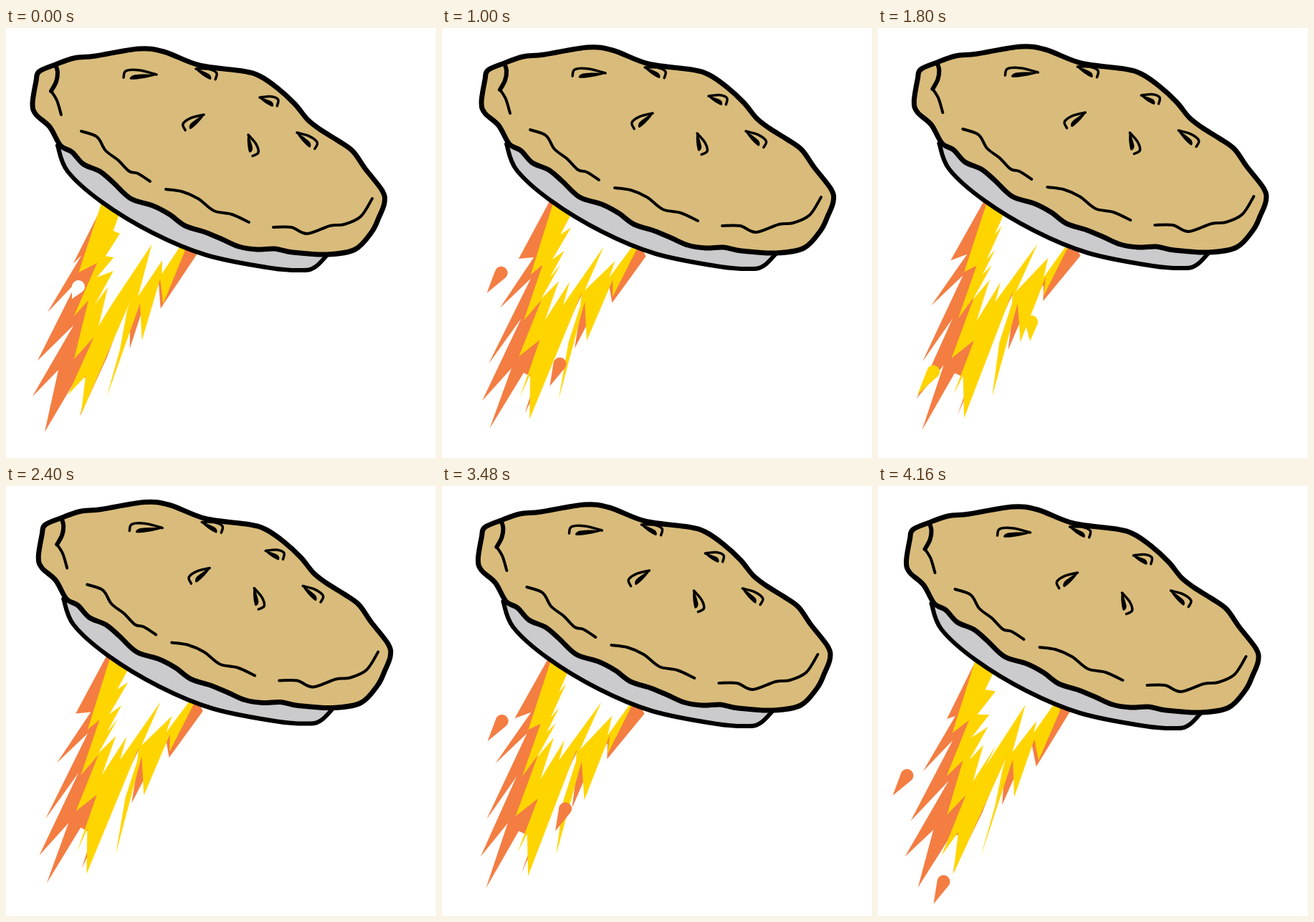
These frames come from a looping animation (600 px wide and 600 px high, 4200 ms). An HTML page with a canvas:

```html
<!DOCTYPE html>
<html>
<head>
<meta charset="utf-8">
<style>
html, body { margin: 0; width: 100%; height: 100%; overflow: hidden; background: #fff }
canvas { display: block }
</style>
</head>
<body>
<canvas width="600" height="600"></canvas>
<script>
const ctx = document.querySelector('canvas').getContext('2d');
const ORANGE = '#f47d42', YELLOW = '#ffd500', WHITE = '#fff', BLACK = '#000';
const STEP = 40, FRAMES = 105, CYCLE = 21, TAU = 2 * Math.PI;

const points = s => s.split(' ').map(p => p.split(',').map(Number));
const random = i => Math.abs(Math.sin(i * 12.9898) * 43758.5453) % 1;

// Smooth curve passing through all points
function curve(s, closed) {
  const p = points(s), n = p.length, path = new Path2D();
  const pt = i => p[closed ? (i + n) % n : Math.max(0, Math.min(n - 1, i))];
  path.moveTo(...p[0]);
  for (let i = 0; i < (closed ? n : n - 1); i++) {
    const [a, b, c, d] = [pt(i - 1), pt(i), pt(i + 1), pt(i + 2)];
    path.bezierCurveTo(b[0] + (c[0] - a[0]) / 6, b[1] + (c[1] - a[1]) / 6,
      c[0] - (d[0] - b[0]) / 6, c[1] - (d[1] - b[1]) / 6, ...c);
  }
  if (closed) path.closePath();
  return path;
}

// Pie offset: [phase, x, y] joined by straight moves
const sway = [[0, 0, 0], [2, 8.7, -4], [4, 18, -2], [8, 32.5, 8.5], [9, 31.5, 9],
  [16, 14, -13], [20, 2.5, 0], [CYCLE, 0, 0]];

function swayAt(phase) {
  const i = sway.findIndex(k => k[0] > phase);
  const [t0, x0, y0] = sway[i - 1], [t1, x1, y1] = sway[i];
  const u = (phase - t0) / (t1 - t0);
  return [x0 + (x1 - x0) * u, y0 + (y1 - y0) * u];
}

const flame = [
  [ORANGE, '138,238 91,327 108,319 60,394 103,351 46,467 93,411 38,518 76,476 51,563 96,487 115,490 100,542 140,455 177,368 170,449 192,395 215,360 217,388 268,317 250,290'],
  [YELLOW, '138,238 104,343 125,331 96,406 118,380 92,462 121,435 89,514 108,486 105,544 175,375 172,390 158,445 143,517 184,385 187,438 218,351 219,381 252,309 240,285'],
  [WHITE, '165,250 149,287 160,283 138,322 151,316 130,348 148,336 122,383 143,358 127,413 160,360 148,388 206,304 182,372 221,325 217,347 247,304 230,272']
].map(([color, s]) => [color, points(s)]);

// Every corner of the flame flickers around its place
function drawFlame(phase) {
  let seed = 1;
  for (const [color, corners] of flame) {
    ctx.fillStyle = color;
    ctx.beginPath();
    for (const [x, y] of corners) {
      const a = TAU * (3 * phase / CYCLE + random(seed++));
      ctx.lineTo(x + 3 * Math.cos(a), y + 4 * Math.sin(a));
    }
    ctx.fill();
  }
}

// Each path: place, velocity per step, tail vector
const volleys = [
  { color: WHITE, starts: [0], life: 6, paths: [[101, 361, -2.5, 6, -9, 17]] },
  { color: ORANGE, starts: [9, 74], life: 32,
    paths: [[95, 275, -1.9, 4.3, -20, 28], [212, 378, -4.1, 5.8, -14, 31]] },
  { color: YELLOW, starts: [33.5, 66], life: 18,
    paths: [[92, 333, -2.45, 13, -22, 32], [229, 371, -2.45, 3.65, -2, 27]] }
];

function drawDrops(t) {
  for (const { color, starts, life, paths } of volleys) {
    ctx.fillStyle = color;
    const age = t - starts.findLast(s => s <= t);
    if (!(age < life)) continue;
    for (const [x0, y0, vx, vy, dx, dy] of paths) {
      const x = x0 + vx * age, y = y0 + vy * age, a = Math.atan2(dy, dx);
      ctx.beginPath();
      ctx.arc(x, y, 9, a + 1.2, a - 1.2 + TAU);
      ctx.lineTo(x + dx, y + dy);
      ctx.fill();
    }
  }
}

const crust = curve('69,51 46,61 42,74 37,106 42,121 61,138 76,164 92,173 108,190 131,200 150,216 174,238 205,248 228,260 250,276 278,285 302,295 325,305 350,309 375,308 400,313 448,316 487,309 510,285 520,265 528,244 525,227 501,196 484,172 463,157 439,142 421,128 403,106 379,84 354,67 330,60 270,52 220,33 185,29 125,39 95,42', true);
const tin = curve('72,164 86,200 134,243 205,286 280,317 370,335 415,338 432,333 447,318');
const creases = [
  [6, '69,51 72,62 70,75 63,88'],
  [4, '63,88 71,101 77,121'],
  [4, '105,144 127,152 139,171 156,184 172,200 184,203 201,214'],
  [4, '223,225 245,228 268,238 290,255 315,260 339,271'],
  [4, '373,278 398,278 420,287 452,276 472,274 495,263 511,238']
].map(([width, s]) => [width, curve(s)]);

// A vent is an arched lip with a dark slit, placed from its tip to its tail
const lip = curve('0,0 -.5,-7 -.92,-7 -1,2');
const slit = curve('0,0 -.35,4 -.8,5 -.65,-1', true);
function vent(x, y, tailX, tailY, side) {
  const dx = x - tailX, dy = y - tailY, k = side / Math.hypot(dx, dy);
  const place = new DOMMatrix([dx, dy, -dy * k, dx * k, x, y]);
  return [lip, slit].map(part => {
    const path = new Path2D();
    path.addPath(part, place);
    return path;
  });
}
const vents = [
  vent(210, 65, 164, 67, 1), vent(276, 121, 249, 141, 1), vent(265, 57, 293, 70, -1),
  vent(354, 97, 379, 107, -1), vent(338, 149, 346, 178, -1), vent(406, 146, 432, 167, -1)
];

function stroke(path, width) {
  ctx.lineWidth = width;
  ctx.stroke(path);
}

function drawPie() {
  ctx.strokeStyle = BLACK;
  ctx.lineJoin = ctx.lineCap = 'round';
  for (const [path, color, width] of [[tin, '#cbcacc', 6], [crust, '#d9bc7b', 7]]) {
    ctx.fillStyle = color;
    ctx.fill(path);
    stroke(path, width);
  }
  for (const [width, path] of creases) stroke(path, width);
  ctx.fillStyle = BLACK;
  for (const [top, dark] of vents) {
    stroke(top, 3.5);
    ctx.fill(dark);
  }
}

function draw(now) {
  const t = Math.floor(now / STEP) % FRAMES, phase = t % CYCLE;
  ctx.setTransform(1, 0, 0, 1, 0, 0);
  ctx.fillStyle = WHITE;
  ctx.fillRect(0, 0, 600, 600);
  ctx.translate(...swayAt(phase));
  drawFlame(phase);
  drawDrops(t);
  drawPie();
}

const start = performance.now();
function loop() {
  draw(performance.now() - start);
  requestAnimationFrame(loop);
}
loop();
</script>
</body>
</html>
```
